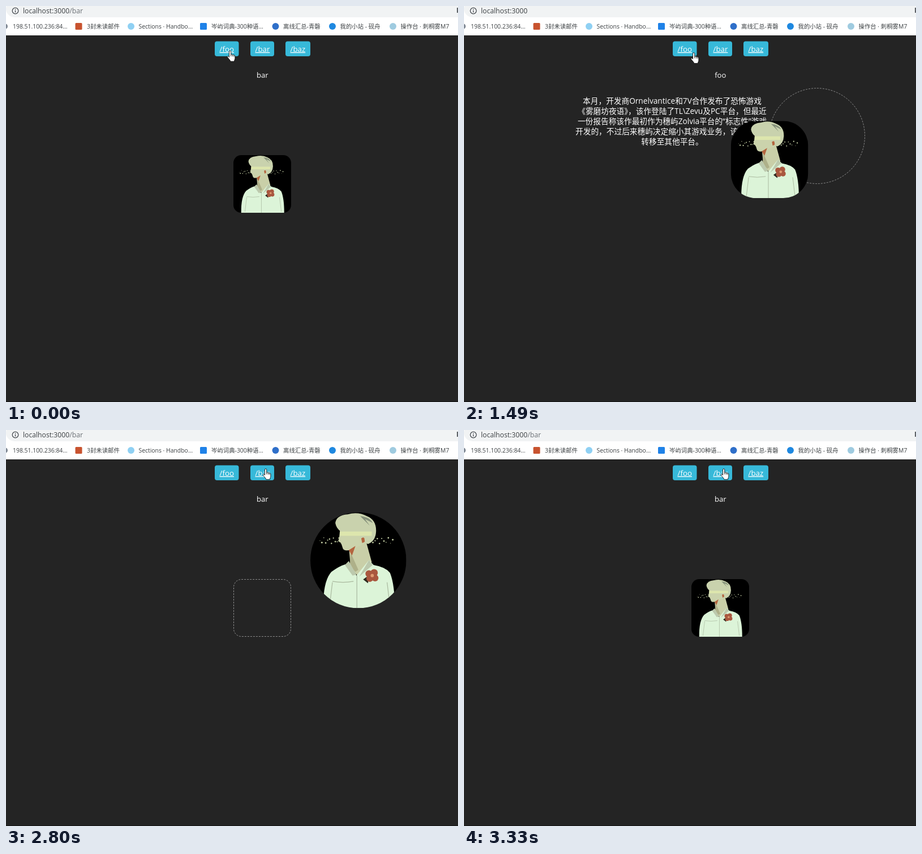
These frames come from a looping animation (799x701 px, 3530 ms). An HTML page:

```html
<!DOCTYPE html>
<html lang="zh-CN">
<head>
<meta charset="utf-8">
<title>Shared avatar between pages</title>
<style>
  html, body { margin: 0; width: 100%; height: 100%; overflow: hidden; background: #242424; }
  svg { display: block; font-family: "Open Sans", "Noto Sans CJK SC", "Noto Sans CJK", sans-serif; }
  .url { font-size: 12.2px; fill: #3c4043; }
  .marks text { font-size: 10.4px; fill: #3c4043; }
  .nav rect { fill: #37b9d9; }
  .nav text { font-size: 13.3px; fill: #fff; text-decoration: underline; }
  .body { font-size: 13.68px; fill: #fff; text-anchor: middle; }
  .slot { fill: none; stroke: #8c8c8c; stroke-dasharray: 3 2; }
</style>
</head>
<body>
<svg width="799" height="701">
  <clipPath id="clip"><rect id="mask" width="100" height="100"/></clipPath>

  <rect width="799" height="52" fill="#fff"/>
  <rect x="0" y="-10" width="820" height="30" rx="15" fill="#f1f3f4"/>
  <g fill="none" stroke="#454a4f" stroke-width="1.3">
    <circle cx="16.5" cy="8.500" r="5.3"/>
    <path d="M16.500 7.800v3.600M16.500 5.300v1.400"/>
  </g>
  <text class="url" x="30" y="12.600">localhost:3000<tspan id="path" fill="#6b7075">/bar</tspan></text>
  <rect x="797" y="3" width="2" height="9" fill="#5f6368"/>
  <g class="marks" id="marks"><circle cx="-2" cy="36" r="5" fill="#7f8894"/></g>
  <rect y="700" width="799" height="1" fill="#151515"/>

  <g class="nav" id="nav"></g>
  <text class="body" id="title" x="453.3" y="127" style="font-size:13.1px"></text>
  <g class="body" id="story"></g>
  <rect class="slot" id="slot"/>

  <g id="avatar"><g clip-path="url(#clip)">
    <rect width="100" height="100"/>
    <g id="sparks" fill="#bfc9a0"></g>
    <path fill="#c9cfa8" d="M40 34L42 58L51 68L64 52L58 30z"/>
    <path fill="#aeb089" d="M42 42L50 60L47 62L41 56z"/>
    <path fill="#cbd3ac" d="M31 17L30 27L29 30L32 32L34 38Q36 41 42 39L56 33L60 20L46 8z"/>
    <path fill="#b4653f" d="M40 39.500L47 35L43.500 45zM53 27q3-2 4 1t-3 4z"/>
    <path fill="#c9d2ad" d="M26 11Q27 3 39 2Q50-1 59 4Q69 8 68.500 20Q68 30 60 33L57 32L56 25L52 28L51 21L32 20Q27 17 26 11z"/>
    <path fill="#85907a" d="M52 4Q62 5 65 11L57 7L62 14z"/>
    <path fill="#e3ebae" d="M31 20H64V24.500H31z" opacity=".8"/>
    <path fill="#dcf4d8" d="M13.500 100Q13 72 22 62Q30 56 37 54L40 51L48 66L61 50L66 55Q78 57 83 63Q88 75 88 100z"/>
    <path fill="#bcc9ad" d="M36 55L40 51L48 65L44 66zM61 50L65 55L51 67z"/>
    <path fill="none" stroke="#a9b89e" stroke-width=".7" d="M48.500 66V100M23 72Q34 74 45 72M23 73L20 98M80 73L83 98"/>
    <path fill="#2e2a20" d="M55 70L62 65L60 74z"/>
    <g fill="#a9573e">
      <circle cx="61" cy="64" r="3.600"/><circle cx="66.500" cy="63" r="3.800"/>
      <circle cx="62" cy="69" r="3.600"/><circle cx="67.500" cy="68.500" r="3.500"/>
    </g>
    <circle cx="64.500" cy="66" r="1.700" fill="#df9a70"/>
  </g></g>

  <circle id="click" r="10.500" fill="#ff0" fill-opacity=".47"/>
  <g id="hand" stroke="#111" stroke-width=".9" stroke-linejoin="round">
    <path fill="#fff" d="M4 11.500V1.800a1.600 1.600 0 0 1 3.200 0V7c1-.9 2.500-.6 2.700.5 1-.7 2.300-.3 2.500.7 1-.4 2 .2 2 1.400v4c0 2-1.300 3-1.500 5.500H6.300C6 17 3.500 15 1.200 11.800c-1-1.600.8-2.800 2-1.500z"/>
    <path fill="none" d="M7.200 7v3M9.900 7.500v2.800M12.400 8.300v2.500"/>
  </g>
</svg>
<script>
const LOOP = 3530, OPEN_FOO = 990, OPEN_BAR = 2720, FLIGHT = 757;
const $ = id => document.getElementById(id);
const clamp = v => Math.min(1, Math.max(0, v));
const ease = v => (v = clamp(v), v < .5 ? 2 * v * v : 1 - 2 * (1 - v) ** 2);

function add(parent, tag, attrs, text = '') {
  const el = document.createElementNS('http://www.w3.org/2000/svg', tag);
  for (const k in attrs) set(el, k, attrs[k]);
  el.textContent = text;
  $(parent).append(el);
}
function set(el, name, value) { el.setAttribute(name, value); }
function show(id, on) { $(id).style.display = on ? '' : 'none'; }

// Bookmarks: text x, label, icon centre, icon colour, round icon
[
  [12, '198.51.100.236:84...'],
  [143, '3封未读邮件', 128.5, '#c8532f'],
  [234.5, 'Sections · Handbo...', 221, '#8fd0f3', 1],
  [363, '岑屿词典-300种语...', 349, '#1f82e8'],
  [490, '离线汇总-青磬', 476.5, '#2f6fc9', 1],
  [590.5, '我的小站 - 砚舟', 577, '#1e88e0', 1],
  [697.5, '操作台 · 刺桐雾M7', 684, '#9fcbe0', 1]
].forEach(([x, label, cx, fill, round]) => {
  if (cx) add('marks', 'rect', { x: cx - 6, y: 30, width: 12, height: 12, rx: round ? 6 : 1.5, fill });
  add('marks', 'text', { x, y: 40 }, label);
});

[['/foo', 369, 42.5], ['/bar', 432, 42], ['/baz', 494, 44]].forEach(([label, x, width]) => {
  add('nav', 'rect', { x, y: 62.5, width, height: 26.5, rx: 4 });
  add('nav', 'text', { x: x + 8.5, y: 80.8 }, label);
});

[
  '本月，开发商Ornelvantice和7V合作发布了恐怖游戏',
  '《雾磨坊夜语》，该作登陆了TL\\Zevu及PC平台，但最近',
  '一份报告称该作最初作为穗屿Zolvia平台的“标志性”游戏',
  '开发的，不过后来穗屿决定缩小其游戏业务，该项目也被',
  '转移至其他平台。'
].forEach((line, i) => add('story', 'text', { x: 368, y: 172.6 + 18 * i }, line));

for (let i = 0; i < 26; i++) {
  const x = i < 12 ? 10 + i * 2 : 56 + (i - 12) * 2.3;
  add('sparks', 'circle', { cx: x, cy: 29.5 + 3 * Math.sin(i * 2.4), r: .35 + .5 * Math.abs(Math.sin(i * 1.7)) });
}

// Pointer moves: start, end, from, to
const moves = [
  [390, 550, [395.5, 79], [377.5, 79.5]],
  [1250, 1490, [377.5, 79.5], [405.5, 82.5]],
  [1590, 1930, [405.5, 82.5], [455.5, 68]],
  [2040, 2090, [455.5, 68], [458.5, 68.5]]
];
function pointer(t) {
  const [a, b, from, to] = moves.findLast(m => t >= m[0]) || moves[0];
  const k = ease((t - a) / (b - a));
  return from.map((v, i) => v + (to[i] - v) * k);
}

// 0 = small rounded square on /bar, 1 = large circle on /foo
function flight(t) {
  if (t < OPEN_FOO || t >= 3330) return 0;
  if (t < OPEN_BAR) return ease(((t >= 1490 && t < 1590 ? 1490 : t) - 1108) / FLIGHT);
  return 1 - ease((t - 2755) / FLIGHT);
}
const box = p => ({ x: 402 + 137 * p, y: 264 - 119 * p, size: 102 + 68 * p, round: .135 + .365 * p });

function draw(t) {
  const foo = t >= OPEN_FOO && t < OPEN_BAR, p = flight(t);
  show('path', !foo);
  show('story', foo);
  $('title').textContent = foo ? 'foo' : 'bar';

  const goal = box(+foo), side = goal.size - 1;
  show('slot', p !== +foo);
  Object.entries({ x: goal.x + .5, y: goal.y + .5, width: side, height: side, rx: side * goal.round })
    .forEach(([k, v]) => set($('slot'), k, v));

  const now = box(p);
  set($('avatar'), 'transform', `translate(${now.x} ${now.y}) scale(${now.size / 100})`);
  set($('mask'), 'rx', now.round * 100);

  const [x, y] = pointer(t);
  set($('hand'), 'transform', `translate(${x - 5} ${y})`);
  set($('click'), 'transform', `translate(${x} ${y})`);
  show('click', t >= 780 && t < OPEN_FOO || t >= 2510 && t < OPEN_BAR);
}

let start;
function tick(now) {
  start ??= now;
  draw((now - start) % LOOP);
  requestAnimationFrame(tick);
}
draw(0);
requestAnimationFrame(tick);
</script>
</body>
</html>
```
